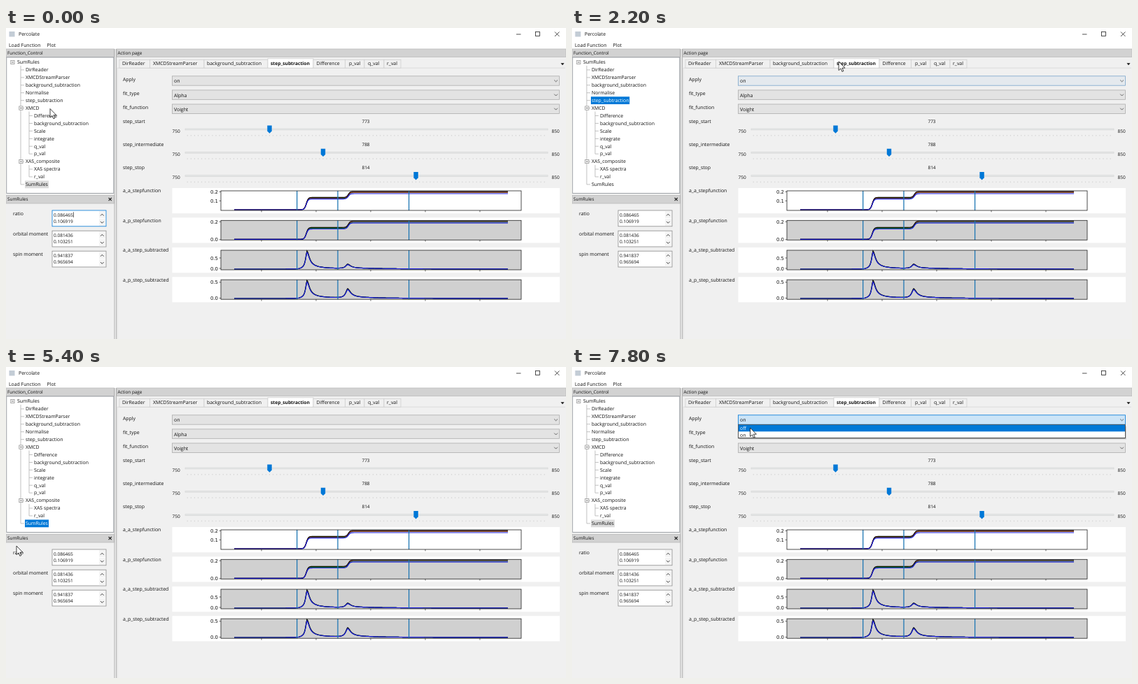
An HTML page for the animation above (8 s loop, 800 px wide and 445 px high).

```html
<!DOCTYPE html>
<html lang="en">
<head>
<meta charset="utf-8">
<title>Percolate</title>
<style>
html, body { margin: 0; width: 100%; height: 100%; overflow: hidden; background: #f0f0f0; }
svg { display: block; width: 100%; height: 100%; }
text { font: 6.9px "Open Sans", "Noto Sans", sans-serif; fill: #111; text-rendering: geometricPrecision; white-space: pre; }
text.dock { font-size: 6.4px; }
text.num { font-size: 6.5px; }
text.mid { text-anchor: middle; }
text.bold { font-size: 6.7px; font-weight: 700; }
text.tick { font: 6.9px "DejaVu Sans", sans-serif; text-anchor: end; }
</style>
</head>
<body>
<svg id="stage" viewBox="0 0 800 445"></svg>
<script>
const stage = document.getElementById('stage');

function add(tag, attrs, parent = stage) {
  const node = document.createElementNS('http://www.w3.org/2000/svg', tag);
  for (const key in attrs) node.setAttribute(key, attrs[key]);
  return parent.appendChild(node);
}
const box = (x, y, w, h, fill, stroke, parent) =>
  add('rect', { x, y, width: w, height: h, fill, stroke: stroke || 'none', 'stroke-width': 0.8 }, parent);
const path = (d, stroke, width = 0.8, fill = 'none', parent) =>
  add('path', { d, stroke, fill, 'stroke-width': width }, parent);
function text(x, y, str, cls = '', parent) {
  const node = add('text', { x, y, class: cls }, parent);
  node.textContent = str;
  return node;
}
const show = (node, on) => node.setAttribute('visibility', on ? 'visible' : 'hidden');

function drawWindow() {
  box(0, 0, 800, 445, '#f0f0f0');
  box(0, 0, 800, 30, '#fff');
  box(4.5, 5, 8, 7.5, '#c3ccd6');
  text(18, 11.2, 'Percolate');
  path('M729 9H735.5M784 5.5L790.5 12M790.5 5.5L784 12', '#222');
  box(756.5, 5.5, 6, 6, 'none', '#222');
  text(4, 26.6, 'Load Function');
  text(58.5, 26.6, 'Plot');

  box(0, 30, 154.5, 11.5, '#d2d2d2', '#bcbcbc');
  box(158, 30, 642, 11.5, '#d2d2d2', '#bcbcbc');
  box(0, 239.5, 154.5, 11.5, '#d2d2d2', '#bcbcbc');
  text(2, 38.2, 'Function_Control', 'dock');
  text(159.5, 38.2, 'Action page', 'dock');
  text(2, 247.3, 'SumRules', 'dock');
  path('M146.6 243L150.8 247.2M150.8 243L146.6 247.2', '#222', 1.1);
  path('M155 30V445M157.6 30V445', '#a6a6a6', 0.9);
}

// Each entry: depth and caption
const treeItems = [
  [0, 'SumRules'], [1, 'DirReader'], [1, 'XMCDStreamParser'], [1, 'background_subtraction'],
  [1, 'Normalise'], [1, 'step_subtraction'], [1, 'XMCD'], [2, 'Difference'],
  [2, 'background_subtraction'], [2, 'Scale'], [2, 'integrate'], [2, 'q_val'], [2, 'p_val'],
  [1, 'XAS_composite'], [2, 'XAS spectra'], [2, 'r_val'], [1, 'SumRules']
];
const rowY = i => 49 + i * 10.93;

function drawTree() {
  box(0.8, 42, 153, 194.5, '#fff', '#8b8f96');
  path(`M21 54V${rowY(16)}M33 ${rowY(6) + 5}V${rowY(12)}M33 ${rowY(13) + 5}V${rowY(15)}`, '#a8a8a8', 0.7);
  const marks = {
    step: box(27, rowY(5) - 5.4, 55.2, 10.8, '#0078d7'),
    sum: box(27, rowY(16) - 5.4, 34, 10.8, '#0078d7')
  };
  const labels = treeItems.map(([depth, name], i) => {
    const y = rowY(i), x = 16 + depth * 12;
    if (depth) path(`M${x - 7} ${y}H${x - 2}`, '#a8a8a8', 0.7);
    if ([0, 6, 13].includes(i)) {
      box(x - 9.2, y - 2.6, 5.2, 5.2, '#fff', '#929292');
      path(`M${x - 8} ${y}H${x - 5.2}`, '#333', 0.7);
    }
    return text(x, y + 2.3, name);
  });
  return { marks, stepText: labels[5], sumText: labels[16] };
}

function drawSpin(label, y, top, bottom) {
  text(10, y + 6.8, label);
  const frame = box(66, y, 77, 22.8, '#fff', '#8a8a8a');
  text(68, y + 8.6, top, 'num');
  text(68, y + 17.6, bottom, 'num');
  box(133, y + 1, 9, 10, '#f4f4f4');
  box(133, y + 12, 9, 10, '#f4f4f4');
  path(`M135 ${y + 7.6}l2.3 -2.4l2.3 2.4M135 ${y + 15.8}l2.3 2.4l2.3 -2.4`, '#333', 0.9);
  return frame;
}

function drawTabs() {
  const names = ['DirReader', 'XMCDStreamParser', 'background_subtraction', 'step_subtraction', 'Difference', 'p_val', 'q_val', 'r_val'];
  const edges = [162, 205.5, 283, 374, 439, 484.5, 512, 540, 564];
  const starts = [166, 210, 287, 378, 443.5, 490, 517, 544];
  path('M159 445V57.2H799', '#d9d9d9');
  names.forEach((name, i) => {
    const active = i === 3;
    const top = active ? 43.8 : 45.3;
    box(edges[i], top, edges[i + 1] - edges[i], 57.2 - top, active ? '#fff' : '#f0f0f0', '#cfcfcf');
    text(starts[i], 53.4, name, active ? 'bold' : '');
  });
  path('M792.5 50.3H797.5L795 53.2Z', 'none', 0, '#111');
}

function drawCombo(label, y, value) {
  text(167, y + 7.2, label);
  const frame = box(237.4, y, 553, 13.4, '#e3e3e3', '#adadad');
  text(240, y + 9.6, value);
  path(`M783.2 ${y + 5.7}l2.4 2.4l2.4 -2.4`, '#444');
  return frame;
}

function drawSlider(label, y, value) {
  const place = v => 259.2 + (v - 750) * 5.1;
  const x = place(value);
  text(167, y - 9.4, label);
  text(514, y - 9.4, value, 'num mid');
  text(237.5, y + 4.6, '750', 'num');
  text(779.5, y + 4.6, '850', 'num');
  box(256, y - 0.9, 518, 1.8, '#e7eaea', '#d8d8d8');
  let ticks = '';
  for (let v = 750; v <= 850; v++) ticks += `M${place(v).toFixed(1)} ${y + 8}v1.6`;
  path(ticks, '#c6c6c6', 0.7);
  path(`M${x - 3.2} ${y - 5.6}h6.4v8.2l-3.2 3.2l-3.2 -3.2Z`, 'none', 0, '#0078d7');
}

const rise = (x, at) => 1 / (1 + Math.exp((at - x) / 1.4));
const stepCurve = (first, second) => x => first * rise(x, 429) + second * rise(x, 489);

// Sharp edge on the left, wider shoulder and fading tail on the right
function peak(x, at, left, right) {
  const d = x - at;
  const core = 1 / (1 + (d / (d < 0 ? left : right)) ** 2);
  return d < 0 ? core * Math.exp(d / 14) : 0.72 * core + 0.28 * Math.exp(-d / 13);
}
const peakCurve = (first, second) => x =>
  first * peak(x, 430, 2.8, 4) + second * peak(x, 488, 4, 5) + 0.9 * rise(x, 420) * (x < 520 ? 1 : Math.exp((520 - x) / 60));

function drawPlot(label, y, fill, base, ticks, curves) {
  text(167, y + 2.4, label);
  box(237.5, y - 4, 553.5, 36.2, '#fff');
  box(307, y, 429, 28, fill);
  for (const [value, ty] of ticks) {
    text(303, ty + 2.5, value, 'tick');
    path(`M304.6 ${ty}H307`, '#222', 0.7);
  }
  for (let x = 365; x < 700; x += 78) path(`M${x} ${y + 28}v2.4`, '#222', 0.7);
  for (const [color, height] of curves) {
    let d = '';
    for (let x = 326; x <= 717; x++) d += `${d ? 'L' : 'M'}${x} ${(base - height(x)).toFixed(2)}`;
    path(d, color, 1.2);
  }
  for (const x of [415.7, 474, 575.6]) path(`M${x} ${y}v28`, '#1f77b4', 1.3);
  box(307, y, 429, 28, 'none', '#222');
}

drawWindow();
const tree = drawTree();
const ratioFrame = drawSpin('ratio', 261, '0.086465', '0.106919');
drawSpin('orbital moment', 290.2, '0.081436', '0.103251');
drawSpin('spin moment', 319.2, '0.941837', '0.965694');
const caret = path('M96.4 263.4V271', '#111', 0.7);

drawTabs();
const applyFrame = drawCombo('Apply', 68.8, 'on');
drawCombo('fit_type', 88.9, 'Alpha');
drawCombo('fit_function', 109, 'Voight');
drawSlider('step_start', 145, 773);
drawSlider('step_intermediate', 178.3, 788);
drawSlider('step_stop', 211.6, 814);

const black = '#111', red = '#c01818', green = '#0c7a0c', blue = '#1a1ae0', grey = '#d0d0d0';
drawPlot('a_a_stepfunction', 233, '#fff', 260, [['0.2', 234.3], ['0.1', 247.3]], [
  [green, stepCurve(16.4, 8.4)], [red, stepCurve(17.2, 8)], [black, stepCurve(17.6, 8.6)], [blue, stepCurve(15.4, 7.6)]
]);
drawPlot('a_p_stepfunction', 275.3, grey, 302.3, [['0.2', 277.2], ['0.0', 302.8]], [
  [red, stepCurve(16.4, 9.2)], [green, stepCurve(15.8, 8.2)], [black, stepCurve(17, 9)], [blue, stepCurve(14.8, 8.6)]
]);
drawPlot('a_a_step_subtracted', 318, grey, 345, [['0.5', 329], ['0.0', 344]], [
  [green, peakCurve(24, 5.8)], [black, peakCurve(25.2, 6.2)], [blue, peakCurve(23, 5.4)]
]);
drawPlot('a_p_step_subtracted', 360.2, grey, 387, [['0.5', 363.8], ['0.0', 386.6]], [
  [green, peakCurve(24, 12.4)], [black, peakCurve(25, 13)], [blue, peakCurve(22.6, 11.6)]
]);

const popup = add('g', {});
box(239, 85, 553, 18.6, '#00000022', '', popup);
box(237.4, 82.7, 553, 18.8, '#fff', '#333', popup);
box(237.8, 83, 552.2, 9.3, '#0078d7', '', popup);
text(240, 90.1, 'off', '', popup).style.fill = '#fff';
text(240, 99.5, 'on', '', popup);

const cursor = path('M0 0V12.6L2.9 9.9L4.9 14.4L6.9 13.5L4.9 9.2H8.9Z', '#111', 0.8, '#fff');

// Pointer way: time, x, y
const way = [
  [0, 63, 115.5], [200, 66, 113], [800, 401, 51.5], [1200, 400, 52], [1600, 58, 103], [1800, 60, 102],
  [2000, 300, 74], [2200, 381, 48], [2400, 409, 45], [2600, 245, 60], [2800, 245, 60],
  [3200, 55, 125], [3600, 41, 173], [4000, 45, 205], [4400, 46, 221], [4800, 45, 224],
  [5200, 16, 254], [5400, 15, 256], [5800, 16, 296], [6000, 40, 290], [6400, 215, 78],
  [6600, 280, 73], [6800, 289.5, 70.5], [7000, 288, 73], [7400, 256, 86], [7600, 254.5, 87.5], [7800, 254.5, 87], [8000, 254.5, 87]
];
function pointer(t) {
  const i = way.findIndex(p => p[0] > t);
  const [t0, x0, y0] = way[i - 1], [t1, x1, y1] = way[i];
  const k = (t - t0) / (t1 - t0), e = k * k * (3 - 2 * k);
  return [x0 + (x1 - x0) * e, y0 + (y1 - y0) * e];
}

function applyStyle(t) {
  if (t >= 7000) return ['#cce4f7', '#0078d7'];
  if (t >= 6600 || t === 2000) return ['#e5f1fb', '#0078d7'];
  return t === 2200 ? ['#e4e9ee', '#7ba6ca'] : ['#e3e3e3', '#adadad'];
}

function render(t) {
  const stepOn = t >= 1600 && t < 4400;
  const sumActive = t >= 4400 && t < 7000;
  show(tree.marks.step, stepOn);
  show(tree.marks.sum, !stepOn);
  tree.marks.sum.setAttribute('fill', sumActive ? '#0078d7' : '#dcdcdc');
  tree.stepText.style.fill = stepOn ? '#fff' : '#111';
  tree.sumText.style.fill = sumActive ? '#fff' : '#111';
  ratioFrame.setAttribute('stroke', t < 1600 ? '#0078d7' : '#8a8a8a');
  show(caret, t < 1600 && t % 1000 < 400);
  const [fill, stroke] = applyStyle(t);
  applyFrame.setAttribute('fill', fill);
  applyFrame.setAttribute('stroke', stroke);
  show(popup, t >= 7000);
  cursor.setAttribute('transform', `translate(${pointer(t)})`);
}

function tick() {
  render(Math.floor(performance.now() % 8000 / 200) * 200);
  requestAnimationFrame(tick);
}
tick();
</script>
</body>
</html>
```
